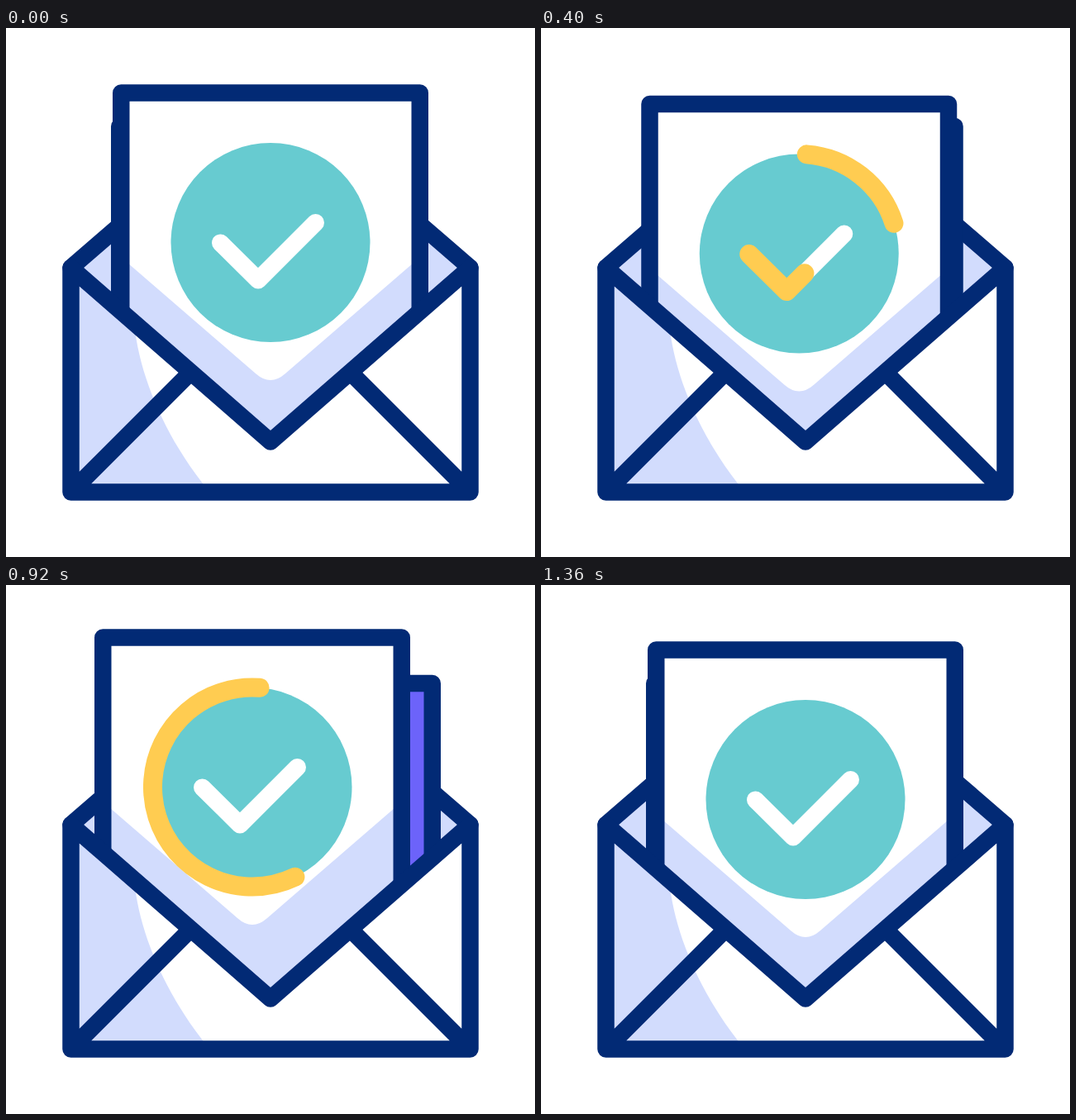
Write an HTML page that moves like this. It is 640 px wide and 640 px high and loops after 1.48 s.

```html
<!DOCTYPE html>
<html>
<head>
<meta charset="utf-8">
<style>
  html, body { margin: 0; height: 100%; overflow: hidden; background: #fff; }
  svg { display: block; width: 100%; height: 100%; fill: none; stroke-linecap: round; stroke-linejoin: round; }
  .ink { stroke: #022a75; stroke-width: 20.5; }
  .shade { fill: #d2dcfd; }
  .tick { stroke: #fff; stroke-width: 21; }
  .glow { stroke: #ffcc51; stroke-width: 23; }
</style>
</head>
<body>
<svg viewBox="0 0 640 640">
  <defs>
    <clipPath id="pocket"><path d="M78.5 0V290L320 500.5L561.5 290V0Z"/></clipPath>
    <path id="check" d="M259.5 260L305 305L374.5 235.5" pathLength="1"/>
  </defs>

  <path class="shade" d="M78.5 290L145 232H495L561.5 290L320 500.5Z"/>
  <path class="ink" d="M145 232.5L78.5 290M495 232.5L561.5 290"/>

  <g clip-path="url(#pocket)">
    <path id="back" class="ink" fill="#6c63fa" d="M139.25 119H500.75V540H139.25Z"/>
    <g id="paper">
      <path fill="#fff" d="M139 78H501V560H139Z"/>
      <path class="shade" d="M140 278L302 418Q320 434 338 418L500 278V560H140Z"/>
      <path class="ink" d="M139.25 78.5H500.75V560H139.25Z"/>
      <circle cx="320" cy="259.5" r="120.5" fill="#67cbd0"/>
      <use href="#check" class="tick"/>
      <use href="#check" class="glow" id="checkGlow"/>
      <circle id="ringGlow" class="glow" cx="320" cy="259.5" r="120.5" pathLength="1" transform="rotate(-85.7 320 259.5)"/>
    </g>
  </g>

  <path class="shade" d="M78.5 290L155 357C161 420 192 492 238 551L245 561H78.5Z"/>
  <path class="ink" d="M78.5 290L320 500.5L561.5 290V561.5H78.5ZM78.5 561.5L221 419M561.5 561.5L419 419"/>
</svg>
<script>
  const LOOP = 1480, STEP = 40;
  const el = id => document.getElementById(id);
  const [back, paper, checkGlow, ringGlow] = ['back', 'paper', 'checkGlow', 'ringGlow'].map(el);

  // Cubic ease from 0 to 1 between two times, arriving with the given slope
  function ease(t, from, to, slope = 0) {
    const p = Math.min(1, Math.max(0, (t - from) / (to - from)));
    return p * p * (3 - slope + (slope - 2) * p);
  }

  const move = (node, x, y) => node.setAttribute('transform', `translate(${x} ${y})`);

  function trim(node, start, end) {
    node.style.display = end - start > 1e-4 ? '' : 'none';
    node.style.strokeDasharray = `${end - start} 2`;
    node.style.strokeDashoffset = -start;
  }

  function draw(t) {
    const dip = ease(t, 80, 320), rise = ease(t, 320, 520), rest = 1 - ease(t, 1080, 1360);
    move(paper, -22 * rise * rest, (29 * dip - 44 * rise) * rest);
    move(back, -2 + 17 * ease(t, 360, 560) * (1 - ease(t, 1040, 1320)), 0);
    trim(checkGlow, ease(t, 400, 790), ease(t, 200, 560));
    trim(ringGlow, ease(t, 596, 1225, .82), ease(t, 200, 920));
  }

  function tick() {
    draw(Math.floor(performance.now() % LOOP / STEP) * STEP);
    requestAnimationFrame(tick);
  }
  tick();
</script>
</body>
</html>
```
